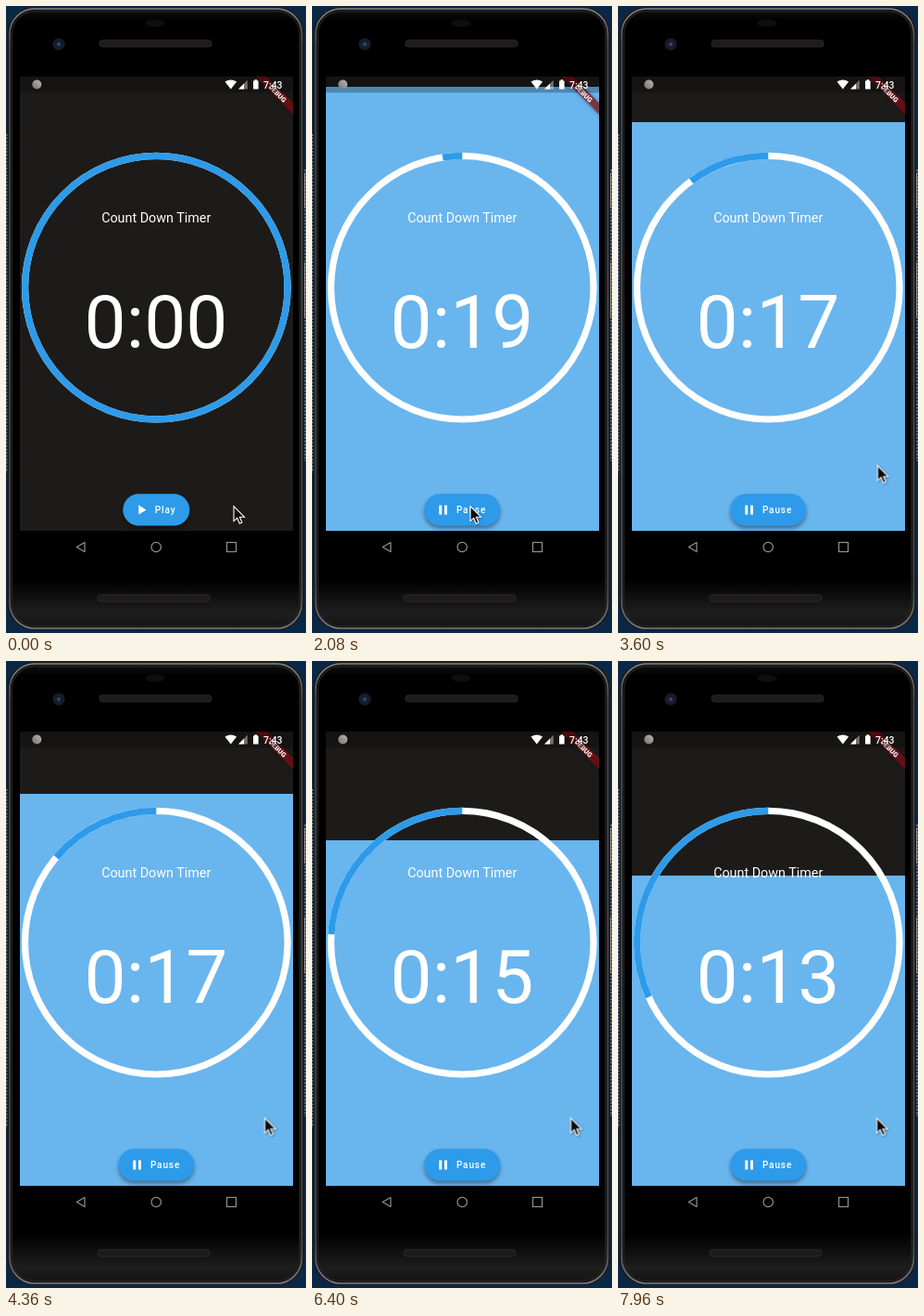
Write an HTML page that moves like this. It is 324x675 px and loops after 8000 ms.

```html
<!DOCTYPE html>
<html lang="en">
<head>
<meta charset="utf-8">
<title>Count Down Timer</title>
<style>
  :root { --blue: #2d9bea; --dark: #1d1b19; }
  html, body { margin: 0; width: 100%; height: 100%; overflow: hidden; background: #0b2746; }
  svg { display: block; width: 324px; height: 675px; }
  text { font-family: Roboto, "Noto Sans", sans-serif; fill: #fff; }

  /* One 8 s loop; the countdown starts at 21% (1680 ms). */
  .fill, .arc, .digits, .cursor, .play, .pause, .pill, .tint, .ripple { animation: 8s linear infinite; }

  .fill { animation-name: drain; }
  @keyframes drain {
    0%, 20.99% { transform: translateY(490px); }
    21% { transform: translateY(1.7px); }
    100% { transform: translateY(156.1px); }
  }

  .arc { stroke-dasharray: 1 1; animation-name: sweep; }
  @keyframes sweep {
    0%, 20.99% { stroke-dashoffset: 0; }
    21% { stroke-dashoffset: .9962; }
    100% { stroke-dashoffset: .6802; }
  }

  .digits { font-size: 80.3px; text-anchor: middle; animation-name: count; animation-timing-function: step-end; }
  @keyframes count {
    0% { transform: none; }
    21% { transform: translateY(-100px); }
    32.5% { transform: translateY(-200px); }
    45% { transform: translateY(-300px); }
    57.5% { transform: translateY(-400px); }
    70% { transform: translateY(-500px); }
    82.5% { transform: translateY(-600px); }
    95%, 100% { transform: translateY(-700px); }
  }

  .play { animation-name: hide; animation-timing-function: step-end; }
  .pause { animation-name: show; animation-timing-function: step-end; }
  @keyframes hide { 0% { visibility: visible; } 21%, 100% { visibility: hidden; } }
  @keyframes show { 0% { visibility: hidden; } 21%, 100% { visibility: visible; } }

  .label { font-size: 10.04px; font-weight: 500; letter-spacing: .86px; }
  .pill { fill: var(--blue); animation-name: lift; }
  @keyframes lift {
    0%, 17%, 24%, 100% { filter: drop-shadow(0 3px 2px rgba(0, 0, 0, .38)); }
    19.5%, 21% { filter: drop-shadow(0 5px 4px rgba(0, 0, 0, .5)); }
  }

  .tint { fill: #e6e6e6; animation-name: tint; }
  @keyframes tint {
    0%, 17% { opacity: 0; }
    19.5%, 21% { opacity: .08; }
    25%, 100% { opacity: 0; }
  }

  .ripple { fill: #e6e6e6; transform-origin: 171px 540px; animation-name: ripple; }
  @keyframes ripple {
    0%, 16.9% { transform: scale(0); opacity: 0; }
    17% { transform: scale(.1); opacity: .08; }
    20% { transform: scale(1); opacity: .06; }
    22% { transform: scale(1.2); opacity: .06; }
    26%, 100% { transform: scale(1.2); opacity: 0; }
  }

  .cursor { animation-name: point; }
  @keyframes point {
    0%, 4.99% { transform: translate(246px, 538px); }
    5%, 6.5% { transform: translate(244.5px, 537.5px); }
    10%, 28% { transform: translate(171px, 538px); }
    33%, 38% { transform: translate(223px, 416px); }
    43% { transform: translate(282px, 500px); }
    46%, 100% { transform: translate(279.5px, 491.5px); }
  }
</style>
</head>
<body>
<svg viewBox="0 0 324 675">
  <defs>
    <linearGradient id="metal" x2="0" y2="1">
      <stop offset="0" stop-color="#858688"/>
      <stop offset=".06" stop-color="#4c4d4f"/>
      <stop offset=".94" stop-color="#4c4d4f"/>
      <stop offset="1" stop-color="#7c7d7f"/>
    </linearGradient>
    <linearGradient id="glass" x2="0" y2="1">
      <stop offset="0" stop-color="#121212"/>
      <stop offset=".02" stop-color="#000"/>
      <stop offset=".92" stop-color="#000"/>
      <stop offset=".975" stop-color="#1e1e1e"/>
      <stop offset="1" stop-color="#121212"/>
    </linearGradient>
    <radialGradient id="lens">
      <stop offset="0" stop-color="#4a5c92"/>
      <stop offset=".4" stop-color="#161d33"/>
      <stop offset="1" stop-color="#1a1b1f"/>
    </radialGradient>
    <linearGradient id="dot" x1="1" x2="0" y2="1">
      <stop offset="0" stop-color="#b8b8b8"/>
      <stop offset="1" stop-color="#727272"/>
    </linearGradient>
    <clipPath id="screen"><path d="M15 76H310V565H15Z"/></clipPath>
    <clipPath id="window"><path d="M60 298H264V386H60Z"/></clipPath>
    <clipPath id="playClip"><rect x="126.3" y="525.2" width="72" height="34.4" rx="17.2"/></clipPath>
    <clipPath id="pauseClip"><rect x="121.3" y="525.2" width="82" height="34.4" rx="17.2"/></clipPath>
  </defs>

  <!-- desktop behind the phone -->
  <path d="M0 0H324V675H0Z" fill="#0b2746"/>
  <path d="M.8 138V502M323.2 176V490" stroke="#77828e" stroke-width="1.6" stroke-dasharray="2 1.6"/>

  <!-- phone -->
  <path d="M321.5 180V218M321.5 276V336" stroke="#8b8d90" stroke-width="3"/>
  <rect x="1.5" y="1" width="320.5" height="671" rx="29" fill="#1b1b1c"/>
  <rect x="4" y="3" width="315.4" height="667" rx="27" fill="url(#glass)" stroke="url(#metal)" stroke-width="1.6"/>
  <rect x="6.2" y="5.4" width="311" height="662.2" rx="25" fill="none" stroke="#222223" stroke-width="1.6"/>
  <ellipse cx="161" cy="18.5" rx="11" ry="4" fill="#0d0d12"/>
  <circle cx="57" cy="41.2" r="6.6" fill="url(#lens)"/>
  <g fill="#1e1b1b" stroke="#302c2c" stroke-width=".8">
    <rect x="101" y="36.8" width="121" height="7.2" rx="3"/>
    <rect x="99" y="633.8" width="121" height="7.2" rx="3"/>
  </g>

  <!-- app -->
  <g clip-path="url(#screen)">
    <path d="M15 76H310V566H15Z" fill="var(--dark)"/>
    <path class="fill" d="M15 76H310V566H15Z" fill="#69b5ee"/>

    <g fill="none" stroke-width="7.2">
      <circle cx="162.3" cy="303.2" r="141.8" stroke="#fff"/>
      <path class="arc" pathLength="1" stroke="var(--blue)"
        d="M162.3 161.4A141.8 141.8 0 0 0 162.3 445A141.8 141.8 0 0 0 162.3 161.4"/>
    </g>

    <text x="162.2" y="233" font-size="14.34" text-anchor="middle">Count Down Timer</text>

    <g clip-path="url(#window)">
      <g class="digits">
        <text x="162" y="368">0:00</text>
        <text x="162" y="468">0:19</text>
        <text x="162" y="568">0:18</text>
        <text x="162" y="668">0:17</text>
        <text x="162" y="768">0:16</text>
        <text x="162" y="868">0:15</text>
        <text x="162" y="968">0:14</text>
        <text x="162" y="1068">0:13</text>
      </g>
    </g>

    <g class="play">
      <rect class="pill" x="126.3" y="525.2" width="72" height="34.4" rx="17.2"/>
      <path d="M143.3 537.3V547.5L151.5 542.4Z" fill="#fff"/>
      <text class="label" x="160.8" y="546">Play</text>
      <g clip-path="url(#playClip)">
        <path class="tint" d="M120 520H205V565H120Z"/>
        <circle class="ripple" cx="171" cy="540" r="48"/>
      </g>
    </g>
    <g class="pause">
      <rect class="pill" x="121.3" y="525.2" width="82" height="34.4" rx="17.2"/>
      <path d="M137.3 537.4h2.9v10h-2.9zM143 537.4h2.9v10H143z" fill="#fff"/>
      <text class="label" x="155.9" y="546">Pause</text>
      <g clip-path="url(#pauseClip)">
        <path class="tint" d="M120 520H205V565H120Z"/>
        <circle class="ripple" cx="171" cy="540" r="48"/>
      </g>
    </g>

    <g transform="translate(310 76) rotate(45)">
      <rect x="-32" y="20" width="64" height="8.7" fill="#8c0f18" fill-opacity=".66"
        style="filter: drop-shadow(0 0 2px rgba(0, 0, 0, .5))"/>
      <text x="1" y="27.2" font-size="7.3" font-weight="900" text-anchor="middle">DEBUG</text>
    </g>

    <!-- status bar -->
    <path d="M15 76H310V93.2H15Z" fill-opacity=".25"/>
    <circle cx="33.3" cy="84.5" r="5" fill="url(#dot)"/>
    <g fill="#fff">
      <path d="M242.8 89.6L236.5 81.6Q242.8 77.2 249.1 81.6Z"/>
      <path d="M260.8 79.8V89.5H251Z" fill-opacity=".4"/>
      <path d="M257 83.6V89.5H251Z"/>
      <path d="M267 80.4h1.5v-1.2h2.6v1.2h1.5v9.2H267z"/>
    </g>
    <text x="278" y="88.7" font-size="10.4" font-weight="500">7:43</text>
  </g>

  <!-- navigation -->
  <g fill="none" stroke="#929292" stroke-width="1.2">
    <path d="M85 577.6V587.6L76.3 582.6Z" stroke-linejoin="round"/>
    <circle cx="162.2" cy="582.5" r="5.2"/>
    <rect x="238.5" y="577.5" width="10" height="10"/>
  </g>

  <g class="cursor">
    <path d="M0 .5V16.6L3.7 13.2L6.3 19.2L8.9 18L6.4 12.2H11.5Z" fill="#0c0c0c" stroke="#fff" stroke-width="1.1"
      style="filter: drop-shadow(1px 1px 1px rgba(0, 0, 0, .35))"/>
  </g>
</svg>
</body>
</html>
```
